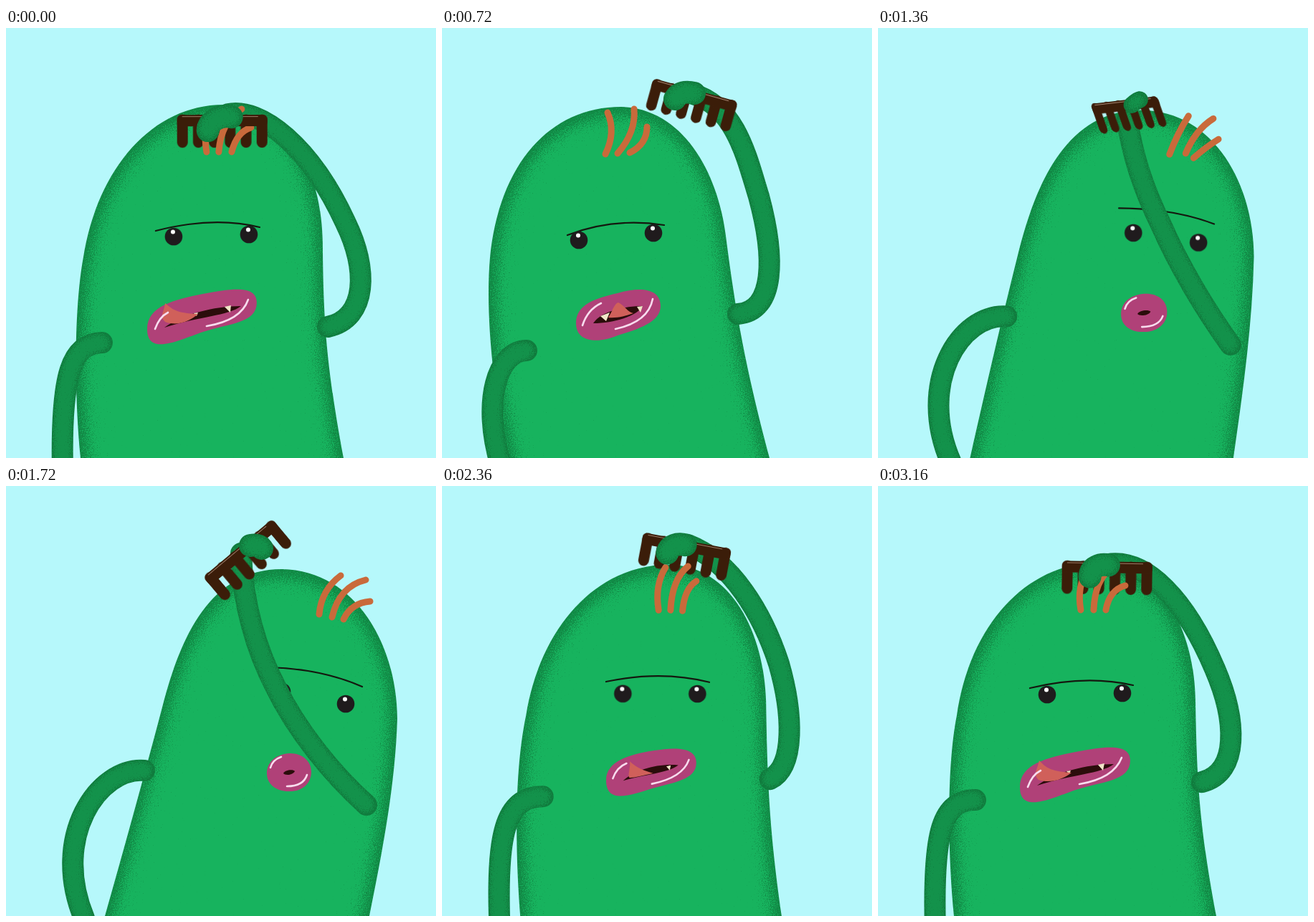
Recreate the animation shown at these times as an HTML page without scripts. Size 600 by 600 pixels, loop 3200 ms.

```html
<!DOCTYPE html>
<html lang="en">
<head>
<meta charset="utf-8">
<title>Combing monster</title>
<style>
html, body { margin: 0; width: 100%; height: 100%; overflow: hidden; background: #b6f8fb; }
svg { display: block; width: 100vw; height: 100vh; }
.m { animation: 3.2s linear infinite; }
.body { fill: #17b35e; filter: url(#shade); animation-name: body; }
.limb { fill: none; stroke: #13924b; stroke-width: 30; stroke-linecap: round; filter: url(#limbshade); }
.left { animation-name: left; }
.right { animation-name: right; }
.hand { stroke-width: 32; animation-name: hand; }
.comb { animation-name: comb; }
.hair { fill: none; stroke: #c96a3b; stroke-width: 9; stroke-linecap: round; animation-name: hair; }
.brow { fill: none; stroke: #14180f; stroke-width: 2.2; stroke-linecap: round; animation-name: brow; }
.eye1 { animation-name: eye1; }
.eye2 { animation-name: eye2; }
.lips { fill: #b04178; animation-name: lips; }
.gap { fill: #2b0d0b; animation-name: gap; }
.teeth { fill: #f0e6c8; animation-name: teeth; }
.tongue { fill: #d0605a; animation-name: tongue; }
.shine { fill: none; stroke: #f8dcee; stroke-width: 2.6; stroke-linecap: round; animation-name: shine; }

@keyframes body {
  0%, 100% { d: path("M104 600C95 510 95 390 108 320C128 195 205 107 304 107C395 108 441 200 442 300C443 410 447 470 471 600L480 720L110 720Z"); animation-timing-function: ease-out; }
  22.5% { d: path("M92 600C72 510 60 400 67 320C80 190 150 110 250 110C335 112 385 200 396 290C410 400 425 480 457 600L480 720L110 720Z"); animation-timing-function: cubic-bezier(.4,0,.7,.8); }
  33.75% { d: path("M113 600C122 520 136 425 158 330C185 215 235 112 338 112C440 112 490 215 490 310C489 410 484 500 478 600L480 720L110 720Z"); animation-timing-function: ease-out; }
  53.75% { d: path("M138 600C165 505 194 400 219 305C244 210 285 116 385 116C490 118 546 225 546 325C543 420 525 510 507 600L480 720L110 720Z"); animation-timing-function: cubic-bezier(.4,0,.7,.8); }
  65% { d: path("M114 600C112 520 110 410 131 320C152 205 225 111 335 111C425 112 466 210 470 300C471 410 471 490 478 600L480 720L110 720Z"); animation-timing-function: ease-out; }
  82.5% { d: path("M107 600C98 510 96 395 111 320C130 195 210 109 308 109C395 110 442 205 444 300C446 410 450 475 472 600L480 720L110 720Z"); animation-timing-function: ease-in; }
  98.75% { d: path("M106 600C97 510 96 390 110 320C128 195 206 108 306 107C395 108 442 202 443 300C445 410 448 472 472 600L480 720L110 720Z"); }
}
@keyframes left {
  0%, 100% { d: path("M134 439C92 440 76 480 79 620"); animation-timing-function: ease-out; }
  22.5% { d: path("M118 450C78 450 55 520 82 610"); animation-timing-function: cubic-bezier(.4,0,.7,.8); }
  33.75% { d: path("M157 411C92 408 40 505 90 610"); animation-timing-function: ease-out; }
  53.75% { d: path("M193 397C129 392 62 490 109 603"); animation-timing-function: cubic-bezier(.4,0,.7,.8); }
  65% { d: path("M149 425C85 425 72 500 82 620"); animation-timing-function: ease-out; }
  82.5% { d: path("M137 437C88 437 77 480 80 620"); animation-timing-function: ease-in; }
  98.75% { d: path("M136 438C90 438 76 480 80 620"); }
}
@keyframes right {
  0%, 100% { d: path("M449 417C505 405 505 335 474 272C425 165 355 110 310 120"); animation-timing-function: ease-out; }
  6.25% { d: path("M445 415C504 405 506 338 472 276C415 170 325 125 275 132"); animation-timing-function: ease-in-out; }
  22.5% { d: path("M413 399C465 395 465 320 442 235C425 180 410 110 350 92"); animation-timing-function: cubic-bezier(.4,0,.7,.8); }
  33.75% { d: path("M474 437C460 380 445 320 425 265C410 230 395 205 380 182"); animation-timing-function: ease-out; }
  53.75% { d: path("M503 445C455 402 405 340 376 280C350 230 330 165 328 94"); animation-timing-function: cubic-bezier(.4,0,.7,.8); }
  65% { d: path("M470 427C500 390 500 320 470 265C430 205 390 150 330 118"); animation-timing-function: ease-out; }
  82.5% { d: path("M452 401C490 392 485 315 470 240C455 165 410 85 350 66"); animation-timing-function: cubic-bezier(.8,0,.9,.6); }
  98.75% { d: path("M452 413C505 400 500 325 470 255C430 160 375 100 320 109"); }
}
@keyframes hand {
  0%, 100% { d: path("M315 124C300 120 282 130 282 143"); animation-timing-function: ease-out; }
  6.25% { d: path("M280 138C265 134 247 144 247 157"); animation-timing-function: ease-in-out; }
  22.5% { d: path("M352 91C340 88 330 90 325 99"); stroke-width: 32; animation-timing-function: cubic-bezier(.4,0,.7,.8); }
  33.75% { d: path("M376 146C376 138 378 128 378 121"); stroke-width: 10; animation-timing-function: ease-out; }
  53.75% { d: path("M341 83C348 82 354 83 357 87"); stroke-width: 32; animation-timing-function: cubic-bezier(.4,0,.7,.8); }
  65% { d: path("M317 118C305 116 293 118 291 128"); animation-timing-function: ease-out; }
  82.5% { d: path("M350 66C340 63 328 66 325 78"); animation-timing-function: cubic-bezier(.8,0,.9,.6); }
  98.75% { d: path("M322 110C310 108 297 112 296 126"); }
}
@keyframes comb {
  0%, 100% { transform: translate(302px,144px) rotate(0deg) skewX(0deg) scale(1,1); animation-timing-function: ease-out; }
  6.25% { transform: translate(267px,158px) rotate(-6deg) skewX(0deg) scale(1,1); animation-timing-function: ease-in-out; }
  22.5% { transform: translate(348px,108px) rotate(15.5deg) skewX(0deg) scale(.97,.97); animation-timing-function: cubic-bezier(.4,0,.7,.8); }
  33.75% { transform: translate(370px,150px) rotate(47deg) skewX(33deg) scale(.33,.86); animation-timing-function: ease-out; }
  53.75% { transform: translate(338px,104px) rotate(-40deg) skewX(0deg) scale(1,1); animation-timing-function: cubic-bezier(.4,0,.7,.8); }
  65% { transform: translate(315px,136px) rotate(15.5deg) skewX(0deg) scale(.98,1); animation-timing-function: ease-out; }
  82.5% { transform: translate(349px,82px) rotate(8.5deg) skewX(0deg) scale(1,1); animation-timing-function: cubic-bezier(.8,0,.9,.6); }
  98.75% { transform: translate(320px,128px) rotate(1deg) skewX(0deg) scale(1,1); }
}
@keyframes hair {
  0%, 100% { d: path("M280 173Q274 140 290 118M297 173Q300 130 329 113M315 173Q322 145 342 139"); animation-timing-function: ease-out; }
  22.5% { d: path("M228 176Q243 145 231 118M245 175Q271 145 268 113M262 174Q286 162 286 138"); animation-timing-function: cubic-bezier(.4,0,.7,.8); }
  33.75% { d: path("M358 172Q382 150 379 119M388 162Q408 145 413 119M391 174Q417 172 422 146"); animation-timing-function: ease-out; }
  53.75% { d: path("M437 179Q440 145 467 125M455 183Q465 140 502 131M471 186Q482 163 508 161"); animation-timing-function: cubic-bezier(.4,0,.7,.8); }
  65% { d: path("M329 174Q322 135 340 113M347 174Q345 130 370 112M363 175Q368 145 383 130"); animation-timing-function: ease-out; }
  82.5% { d: path("M290 173Q285 140 299 114M306 173Q310 130 331 112M323 174Q325 142 342 134"); animation-timing-function: ease-in; }
  98.75% { d: path("M283 173Q277 140 293 115M301 173Q303 130 325 116M318 173Q323 145 345 139"); }
}
@keyframes brow {
  0%, 100% { d: path("M209 283Q290 262 354 278"); animation-timing-function: ease-out; }
  22.5% { d: path("M175 289Q240 264 310 275"); animation-timing-function: cubic-bezier(.4,0,.7,.8); }
  33.75% { d: path("M288 249Q370 247 424 263"); animation-timing-function: ease-out; }
  53.75% { d: path("M366 253Q440 255 497 280"); animation-timing-function: cubic-bezier(.4,0,.7,.8); }
  65% { d: path("M253 260Q330 250 397 269"); animation-timing-function: ease-out; }
  82.5% { d: path("M218 279Q295 260 362 276"); animation-timing-function: ease-in; }
  98.75% { d: path("M212 282Q290 263 356 278"); }
}
@keyframes eye1 {
  0%, 100% { transform: translate(234px,291px); animation-timing-function: ease-out; }
  22.5% { transform: translate(191px,296px); animation-timing-function: cubic-bezier(.4,0,.7,.8); }
  33.75% { transform: translate(310px,284px); animation-timing-function: ease-out; }
  53.75% { transform: translate(385px,287px); animation-timing-function: cubic-bezier(.4,0,.7,.8); }
  65% { transform: translate(275px,287px); animation-timing-function: ease-out; }
  82.5% { transform: translate(242px,291px); animation-timing-function: ease-in; }
  98.75% { transform: translate(236px,291px); }
}
@keyframes eye2 {
  0%, 100% { transform: translate(339px,288px); animation-timing-function: ease-out; }
  22.5% { transform: translate(295px,286px); animation-timing-function: cubic-bezier(.4,0,.7,.8); }
  33.75% { transform: translate(404px,292px); animation-timing-function: ease-out; }
  53.75% { transform: translate(474px,304px); animation-timing-function: cubic-bezier(.4,0,.7,.8); }
  65% { transform: translate(379px,292px); animation-timing-function: ease-out; }
  82.5% { transform: translate(346px,289px); animation-timing-function: ease-in; }
  98.75% { transform: translate(341px,289px); }
}
@keyframes lips {
  0%, 100% { d: path("M197 420C197 388 235 379 275 371C320 362 350 360 350 383C350 412 312 412 275 424C240 436 197 458 197 420Z"); animation-timing-function: ease-out; }
  22.5% { d: path("M187 412C187 385 215 377 245 370C280 360 305 365 305 388C305 410 275 420 245 429C220 440 187 440 187 412Z"); animation-timing-function: cubic-bezier(.4,0,.7,.8); }
  33.75% { d: path("M299 397C299 378 315 368 335 367C355 366 367 376 367 391C367 409 352 420 332 421C313 422 299 413 299 397Z"); animation-timing-function: ease-out; }
  53.75% { d: path("M364 401C364 384 378 374 396 373C414 373 426 384 426 399C426 416 412 427 394 426C377 426 364 416 364 401Z"); animation-timing-function: cubic-bezier(.4,0,.7,.8); }
  65% { d: path("M275 399C276 380 295 370 316 368C337 367 351 377 350 392C349 410 332 421 312 424C291 426 275 418 275 399Z"); animation-timing-function: ease-out; }
  82.5% { d: path("M208 416C208 386 245 377 285 370C330 361 357 362 357 384C357 410 320 410 285 421C250 434 208 456 208 416Z"); animation-timing-function: ease-in; }
  98.75% { d: path("M198 420C198 388 236 379 276 371C321 362 352 360 352 383C352 412 313 412 276 424C241 436 198 458 198 420Z"); }
}
@keyframes gap {
  0%, 100% { d: path("M221 418C245 400 290 388 328 388C310 402 270 402 221 418Z"); animation-timing-function: ease-out; }
  22.5% { d: path("M211 412C222 395 255 388 280 388C272 402 240 412 211 412Z"); animation-timing-function: cubic-bezier(.4,0,.7,.8); }
  33.75% { d: path("M322 396C325 390 340 389 344 392C341 398 325 400 322 396Z"); animation-timing-function: ease-out; }
  53.75% { d: path("M387 401C389 396 401 395 403 398C400 404 389 404 387 401Z"); animation-timing-function: cubic-bezier(.4,0,.7,.8); }
  65% { d: path("M298 401C303 392 322 389 327 393C322 400 305 403 298 401Z"); animation-timing-function: ease-out; }
  82.5% { d: path("M232 416C255 398 290 386 331 388C315 400 270 403 232 416Z"); animation-timing-function: ease-in; }
  98.75% { d: path("M222 418C246 400 291 388 329 388C311 402 271 402 222 418Z"); }
}
@keyframes teeth {
  0%, 100% { d: path("M305 389L314 387L313 397ZM262 398L268 397L266 402Z"); animation-timing-function: ease-out; }
  22.5% { d: path("M272 389L280 388L277 397ZM221 402L234 397L229 409Z"); animation-timing-function: cubic-bezier(.4,0,.7,.8); }
  33.75% { d: path("M333 395L333 395L333 395ZM333 395L333 395L333 395Z"); animation-timing-function: ease-out; }
  53.75% { d: path("M395 400L395 400L395 400ZM395 400L395 400L395 400Z"); animation-timing-function: cubic-bezier(.4,0,.7,.8); }
  65% { d: path("M313 396L313 396L313 396ZM313 396L313 396L313 396Z"); animation-timing-function: ease-out; }
  82.5% { d: path("M313 389L322 387L320 397ZM262 400L266 399L265 402Z"); animation-timing-function: ease-in; }
  98.75% { d: path("M307 389L316 387L314 397ZM263 398L269 397L267 402Z"); }
}
@keyframes tongue {
  0%, 100% { d: path("M222 384C232 392 236 398 268 399C258 408 240 417 222 410C214 402 220 398 222 384Z"); animation-timing-function: ease-out; }
  22.5% { d: path("M246 383C256 388 258 396 267 398C255 402 245 405 232 404C238 395 240 385 246 383Z"); animation-timing-function: cubic-bezier(.4,0,.7,.8); }
  33.75% { d: path("M333 395C333 395 333 395 333 395C333 395 333 395 333 395C333 395 333 395 333 395Z"); animation-timing-function: ease-out; }
  53.75% { d: path("M395 400C395 400 395 400 395 400C395 400 395 400 395 400C395 400 395 400 395 400Z"); animation-timing-function: cubic-bezier(.4,0,.7,.8); }
  65% { d: path("M313 396C313 396 313 396 313 396C313 396 313 396 313 396C313 396 313 396 313 396Z"); animation-timing-function: ease-out; }
  82.5% { d: path("M239 379C250 390 262 396 286 403C265 408 245 413 238 412C234 408 240 395 239 379Z"); animation-timing-function: ease-in; }
  98.75% { d: path("M225 383C234 392 238 398 270 400C260 408 242 416 224 410C216 402 222 397 225 383Z"); }
}
@keyframes shine {
  0%, 100% { d: path("M208 420Q214 403 226 397M280 416Q328 408 338 379"); animation-timing-function: ease-out; }
  22.5% { d: path("M196 415Q203 393 222 384M242 420Q288 410 294 378"); animation-timing-function: cubic-bezier(.4,0,.7,.8); }
  33.75% { d: path("M305 390Q308 378 322 374M330 414Q355 413 361 400"); animation-timing-function: ease-out; }
  53.75% { d: path("M369 393Q372 382 384 378M392 419Q415 419 420 403"); animation-timing-function: cubic-bezier(.4,0,.7,.8); }
  65% { d: path("M283 393Q287 380 300 376M310 417Q337 411 341 391"); animation-timing-function: ease-out; }
  82.5% { d: path("M218 415Q224 398 238 392M285 415Q335 405 346 378"); animation-timing-function: ease-in; }
  98.75% { d: path("M209 420Q215 403 227 397M281 416Q329 408 340 379"); }
}
</style>
</head>
<body>
<svg viewBox="0 0 600 600">
  <defs>
    <!-- speckled inner shading -->
    <filter id="shade" filterUnits="userSpaceOnUse" x="-60" y="-60" width="720" height="720" color-interpolation-filters="sRGB">
      <feFlood flood-color="#000"/>
      <feComposite operator="out" in2="SourceAlpha"/>
      <feGaussianBlur stdDeviation="27" result="rim"/>
      <feTurbulence type="fractalNoise" baseFrequency=".8" numOctaves="2" seed="4" result="grain"/>
      <feComposite operator="arithmetic" in="rim" in2="grain" k2="5" k3="4" k4="-3.2" result="dots"/>
      <feFlood flood-color="#0f8141" flood-opacity=".85"/>
      <feComposite operator="in" in2="dots"/>
      <feComposite operator="atop" in2="SourceGraphic"/>
    </filter>
    <filter id="limbshade" filterUnits="userSpaceOnUse" x="-60" y="-60" width="720" height="720" color-interpolation-filters="sRGB">
      <feFlood flood-color="#000"/>
      <feComposite operator="out" in2="SourceAlpha"/>
      <feGaussianBlur stdDeviation="8" result="rim"/>
      <feTurbulence type="fractalNoise" baseFrequency=".8" numOctaves="2" seed="9" result="grain"/>
      <feComposite operator="arithmetic" in="rim" in2="grain" k2="4" k3="4" k4="-2.9" result="dots"/>
      <feFlood flood-color="#0f7539" flood-opacity=".8"/>
      <feComposite operator="in" in2="dots"/>
      <feComposite operator="atop" in2="SourceGraphic"/>
    </filter>
    <g id="eye">
      <circle r="12.3" fill="#1f1b1d"/>
      <circle cx="-1" cy="-6.5" r="3" fill="#fff"/>
    </g>
  </defs>

  <path class="m body"/>
  <path class="m limb left"/>

  <path class="m brow"/>
  <use href="#eye" class="m eye1"/>
  <use href="#eye" class="m eye2"/>
  <path class="m lips"/>
  <path class="m gap"/>
  <path class="m teeth"/>
  <path class="m tongue"/>
  <path class="m shine"/>

  <path class="m limb right"/>
  <g class="m comb">
    <path d="M-55.5-16V15.5M-33.3-16V15.5M-11.1-16V15.5M11.1-16V15.5M33.3-16V15.5M55.5-16V15.5" fill="none" stroke="#3b1d09" stroke-width="15" stroke-linecap="round"/>
  </g>
  <path class="m hair"/>
  <g class="m comb">
    <rect x="-63" y="-23" width="126" height="16" rx="6" fill="#3b1d09"/>
    <path d="M-56-20.5H50" stroke="#d9b9a4" stroke-width="1.2" opacity=".6"/>
  </g>
  <path class="m limb hand"/>
</svg>
</body>
</html>
```
